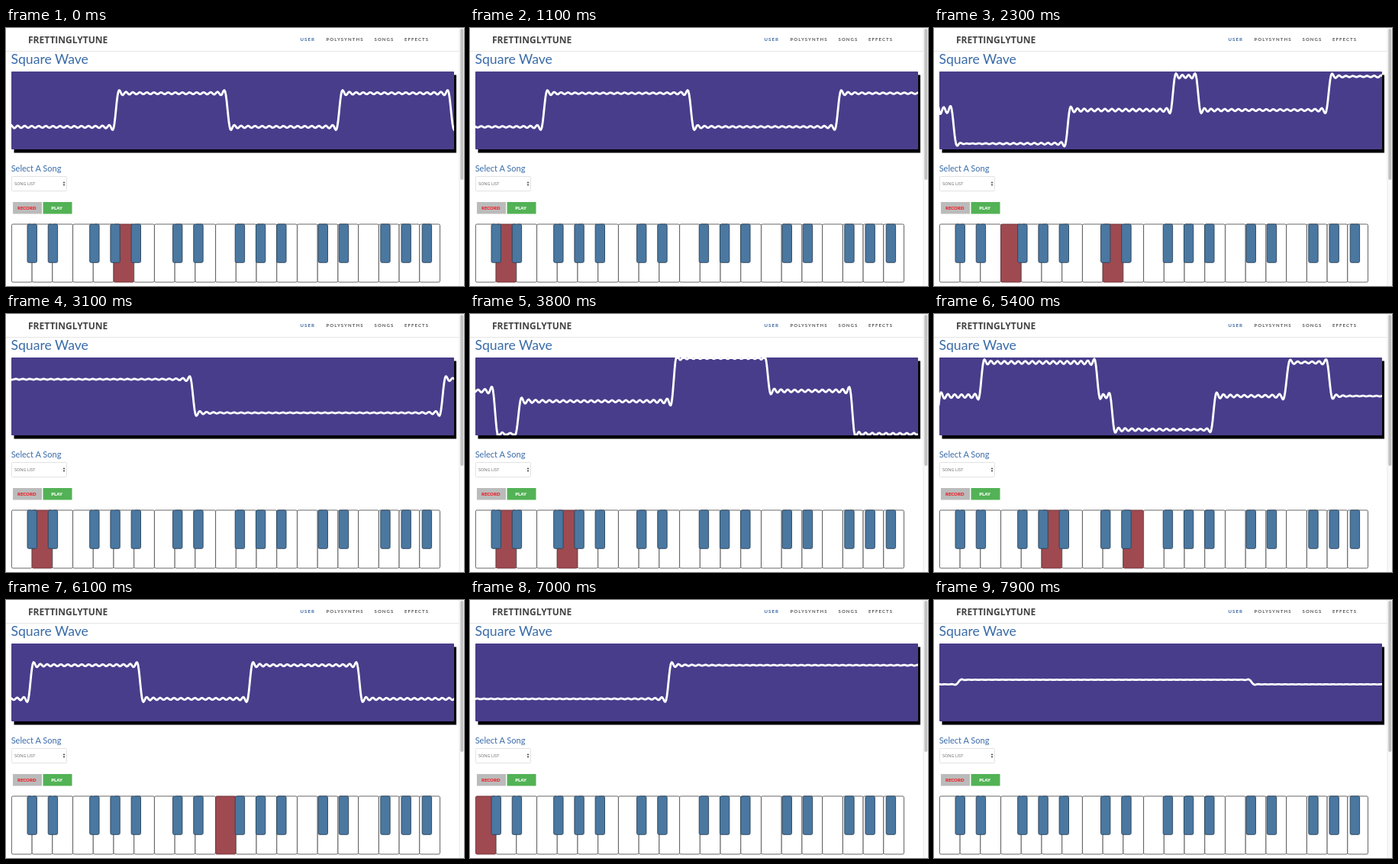
Recreate the animation shown at these times as an HTML page. Size 600 px wide and 338 px high, loop 8 s.

```html
<!DOCTYPE html>
<html lang="en">
<head>
<meta charset="utf-8">
<title>Square Wave</title>
<style>
  html, body { margin: 0; width: 100%; height: 100%; overflow: hidden; background: #fff; }
  svg { display: block; width: 100vw; height: 100vh; }
  text { font-family: Lato, "Open Sans", sans-serif; }
  .brand { font: 700 12px "Open Sans", sans-serif; fill: #444; }
  .nav { font-size: 6px; font-weight: 700; letter-spacing: 1.1px; fill: #555; }
  .nav .on { fill: #3566a0; }
  .head { fill: #386ba8; }
  .list { font: 5.5px "Open Sans", sans-serif; fill: #666; }
  .btn { font-size: 6px; font-weight: 900; }
  .white { fill: #fff; stroke: #555; stroke-width: .9; }
  .white.down { fill: #9f4a50; stroke: #6b3338; }
  .black { fill: #4a78a1; stroke: #2c4259; stroke-width: .9; }
</style>
</head>
<body>
<svg viewBox="0 0 600 338">
  <defs>
    <clipPath id="screen"><rect x="7" y="57" width="580" height="102"/></clipPath>
    <filter id="soft" x="-5%" y="-10%" width="110%" height="120%"><feGaussianBlur stdDeviation=".7"/></filter>
  </defs>

  <path d="M0 30.5H594" stroke="#e6e6e6"/>
  <text class="brand" x="29" y="20">FRETTINGLYTUNE</text>
  <g class="nav">
    <text class="on" x="385.5" y="17">USER</text>
    <text x="419.5" y="17">POLYSYNTHS</text>
    <text x="482.5" y="17">SONGS</text>
    <text x="522" y="17">EFFECTS</text>
  </g>
  <text class="head" x="6.5" y="47" font-size="17.6">Square Wave</text>

  <rect x="10.5" y="61.5" width="579.5" height="102" fill="#000" filter="url(#soft)"/>
  <rect x="7" y="57" width="580" height="102" rx="1" fill="#483d8b"/>
  <path id="wave" clip-path="url(#screen)" fill="none" stroke="#fff" stroke-width="2.8" stroke-linejoin="round"/>

  <text class="head" x="6.7" y="188" font-size="11">Select A Song</text>
  <rect x="7.5" y="194.5" width="72" height="19" rx="1" fill="#fff" stroke="#e2e2e2"/>
  <text class="list" x="11" y="206">SONG LIST</text>
  <path d="M74.5 203.3l1.5-2.3 1.5 2.3zM74.5 204.7l1.5 2.3 1.5-2.3z" fill="#444"/>

  <rect x="9" y="228" width="38" height="15.5" fill="#bbb"/>
  <text class="btn" x="15" y="238" fill="#f0202a">RECORD</text>
  <rect x="48.5" y="228" width="38" height="15.5" fill="#52b255"/>
  <text class="btn" x="59.3" y="238" fill="#fff">PLAY</text>

  <g id="keys"></g>

  <rect x="594" width="6" height="338" fill="#fafafa"/>
  <path d="M594 0V338" stroke="#e8e8e8"/>
  <rect x="595.3" y="1" width="4" height="198" rx="2" fill="#c1c1c1"/>
</svg>
<script>
const LOOP = 8000, STEP = 100;
const LEFT = 7, RIGHT = 587, TOP = 57.5, BOTTOM = 158, MID = 107.5;
const SPEED = 25;          // px of signal per ms
const RIPPLE = 9;          // shortest wavelength kept, px
const RELEASE = 7400, DECAY = 251;

// start ms, pressed white keys, reference ms, voices as [half period, rising edge x, amplitude]
const score = [
  [0, [5], 0, [[146.3, 144]]],
  [400, [7], 600, [[192, 120]]],
  [800, [1], 1100, [[192.5, 97]]],
  [1500, [3], 1700, [[288, 210]]],
  [2000, [3, 8], 2300, [[171, 175], [287, 313]]],
  [2700, [8], 2900, [[171, 90]]],
  [3100, [1], 3300, [[327, 150]]],
  [3500, [1, 4], 3800, [[234, 267, 28.3], [327, 63, 21.5]]],
  [4100, [3, 5], 4300, [[288, 180], [228.5, 60]]],
  [4400, [3, 5, 9], 4700, [[152, 82], [228.5, 351], [288, 241]]],
  [5100, [5, 9], 5300, [[152, 130], [228.5, 220]]],
  [5700, [10], 6100, [[143.7, 32]]],
  [6500, [8], 6700, [[171, 75]]],
  [7000, [0], 7900, [[384, 32]]],
  [RELEASE, [], 7900, [[384, 32]]]
];

const group = document.getElementById("keys");
const wave = document.getElementById("wave");

function addKey(kind, x, width, height) {
  const rect = document.createElementNS("http://www.w3.org/2000/svg", "rect");
  const attrs = { class: kind, x, y: 257, width, height, rx: 1.8 };
  for (const name in attrs) rect.setAttribute(name, attrs[name]);
  group.append(rect);
  return rect;
}

const whites = Array.from({ length: 21 }, (_, i) => addKey("white", 7.4 + i * 26.72, 26.72, 76));
for (let i = 0; i < 20; i++) {
  if (![2, 6].includes(i % 7)) addKey("black", 28 + i * 27.22, 12.4, 50.3);
}

// Band-limited square: odd harmonics only, which gives the overshoot at each edge
function square(x, half) {
  const last = Math.floor(2 * half / RIPPLE);
  let sum = 0, k = 1;
  for (; k <= last; k += 2) sum += Math.sin(Math.PI * k * x / half) / k;
  k -= 2;
  sum += 0.8 * Math.sin(Math.PI * k * x / half) / k;
  return sum * 4 / Math.PI;
}

function draw(t) {
  const [, pressed, ref, voices] = score.filter(row => row[0] <= t).pop();
  whites.forEach((key, i) => key.classList.toggle("down", pressed.includes(i)));
  const level = t > RELEASE ? Math.exp((RELEASE - t) / DECAY) : 1;
  const shift = (t - ref) * SPEED;
  const points = [];
  for (let x = LEFT - 1; x <= RIGHT + 1; x++) {
    let y = MID;
    for (const [half, rise, amp = 22] of voices) y -= level * amp * square(x - rise + shift, half);
    points.push(x + " " + Math.min(BOTTOM, Math.max(TOP, y)).toFixed(2));
  }
  wave.setAttribute("d", "M" + points.join("L"));
}

let shown = -1;
const begin = performance.now();
function frame() {
  const t = Math.floor((performance.now() - begin) % LOOP / STEP) * STEP;
  if (t !== shown) draw(shown = t);
  requestAnimationFrame(frame);
}
frame();
</script>
</body>
</html>
```
